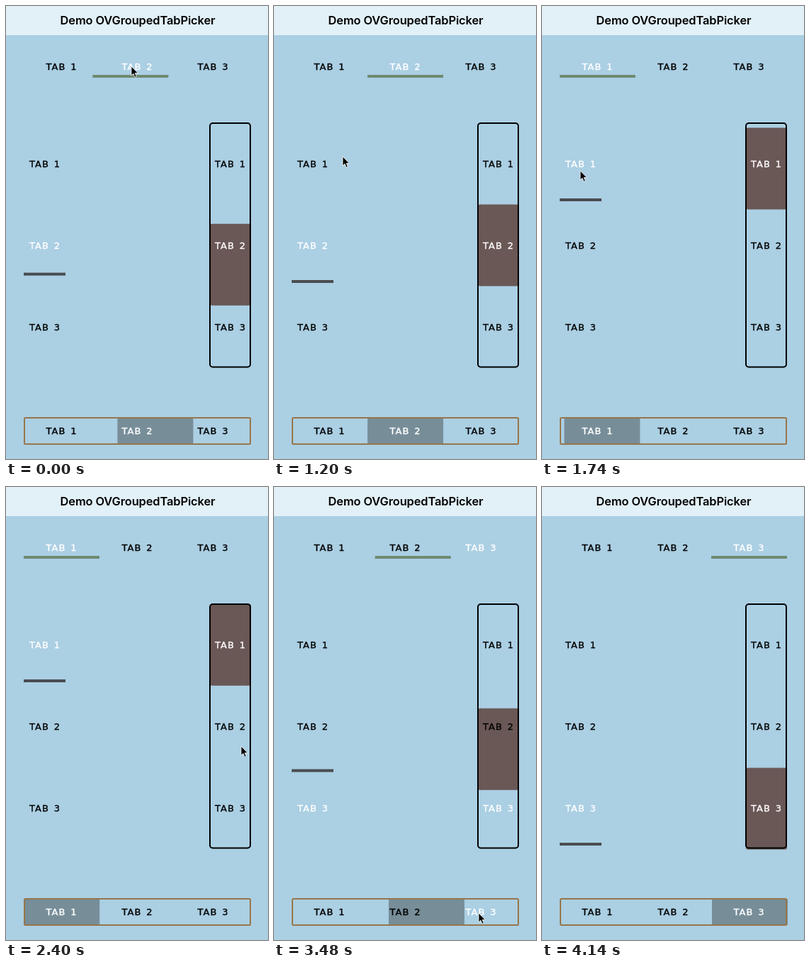
Write an HTML page that moves like this. It is 370x638 px and loops after 4260 ms.

```html
<!DOCTYPE html>
<html lang="en">
<head>
<meta charset="utf-8">
<title>Segmented control demo</title>
<style>
  html, body { margin: 0; width: 100%; height: 100%; overflow: hidden; background: #abcfe3; }
  svg { display: block; width: 370px; height: 638px; }
  .title { font: 600 16.4px Inter, sans-serif; letter-spacing: -.1px; }
  .tab {
    font: 13px "DejaVu Sans", sans-serif; letter-spacing: 1.1px; word-spacing: 1.5px;
    fill: currentColor; stroke: currentColor; stroke-width: .35px; stroke-linejoin: round;
  }
</style>
</head>
<body>
<svg viewBox="0 0 370 638" text-anchor="middle">
  <rect width="370" height="638" fill="#abcfe3"/>
  <rect width="370" height="41" fill="#e2f1f8"/>
  <text class="title" x="186" y="26">Demo OVGroupedTabPicker</text>

  <rect id="topLine" x="25" y="97" width="107" height="4" fill="#6f8a70"/>
  <rect id="leftLine" x="25" y="271" width="59" height="4" fill="#494c50"/>
  <rect id="rightThumb" x="288" y="164.5" width="58" height="115" rx="3" fill="#6a5856"/>
  <rect id="bottomThumb" x="25" y="580" width="107" height="37" rx="1" fill="#778e99"/>

  <g id="labels"></g>

  <rect x="288" y="165" width="57" height="343.5" rx="4" fill="none" stroke="#000" stroke-width="2"/>
  <rect x="26" y="580" width="319" height="37" rx="1.5" fill="none" stroke="#97764a" stroke-width="2"/>
  <path id="cursor" d="M0 0V13L3 10.3 5 15.3 7.3 14.4 5.2 9.6H9.3Z" stroke="#fff" stroke-width=".8"/>
</svg>
<script>
const LOOP = 4260, STEP = 60, LAST = 4140;
const COL = 107, ROW = 115;
const $ = id => document.getElementById(id);

// Each tap selects a segment: [time, from, to]
const taps = [[-237, 0, 1], [1240, 1, 0], [2463, 0, 1], [3414, 1, 2]];

// Pointer stops: [time, x, y]
const stops = [
  [0, 177, 85], [240, 177, 85], [1200, 97, 212], [1250, 54, 232], [1740, 54, 232],
  [2340, 332, 365], [2520, 332, 365], [2880, 295, 512], [3360, 289, 600],
  [3540, 289, 600], [3760, 300, 645], [LOOP, 300, 645]
];

// Three labels for each of the four controls: [x, y, dx, dy]
const labels = [[78.5, 90, COL, 0], [55, 227, 0, ROW], [317, 227, 0, ROW], [78.5, 603, COL, 0]]
  .flatMap(([x, y, dx, dy]) => [0, 1, 2].map(i => {
    const el = document.createElementNS("http://www.w3.org/2000/svg", "text");
    el.setAttribute("class", "tab");
    el.setAttribute("x", x + i * dx);
    el.setAttribute("y", y + i * dy);
    el.textContent = "TAB " + (i + 1);
    $("labels").append(el);
    return { el, i };
  }));

const mix = (a, b, k) => a + (b - a) * k;
const smooth = k => k * k * (3 - 2 * k);

// cubic-bezier(.42, 0, .58, 1), solved by bisection
function easeInOut(x) {
  if (x >= 1) return 1;
  let lo = 0, hi = 1;
  for (let n = 0; n < 20; n++) {
    const s = (lo + hi) / 2, r = 1 - s;
    if (1.26 * r * r * s + 1.74 * r * s * s + s * s * s < x) lo = s; else hi = s;
  }
  return smooth(lo);
}

function spring(sec) {
  const freq = 13, damping = .4, root = Math.sqrt(1 - damping ** 2);
  const angle = freq * root * sec;
  return 1 - Math.exp(-damping * freq * sec) * (Math.cos(angle) + damping / root * Math.sin(angle));
}

const move = (id, x, y) => $(id).setAttribute("transform", `translate(${x} ${y})`);

function draw(t) {
  const [start, from, to] = taps.findLast(tap => tap[0] <= t);
  const line = mix(from, to, easeInOut((t - start) / 300));
  const thumb = mix(from, to, spring((t - start) / 1000));
  move("topLine", line * COL, 0);
  move("leftLine", 0, line * ROW);
  move("rightThumb", 0, thumb * ROW);
  move("bottomThumb", thumb * COL, 0);
  for (const { el, i } of labels) el.style.color = i === to ? "#fff" : "#000";

  const n = stops.findIndex(stop => stop[0] > t);
  const a = stops[n - 1], b = stops[n];
  const k = smooth((t - a[0]) / (b[0] - a[0]));
  move("cursor", mix(a[1], b[1], k), mix(a[2], b[2], k));
}

function tick() {
  const t = performance.now() % LOOP;
  draw(Math.min(LAST, Math.floor(t / STEP) * STEP));
  requestAnimationFrame(tick);
}
tick();
</script>
</body>
</html>
```
